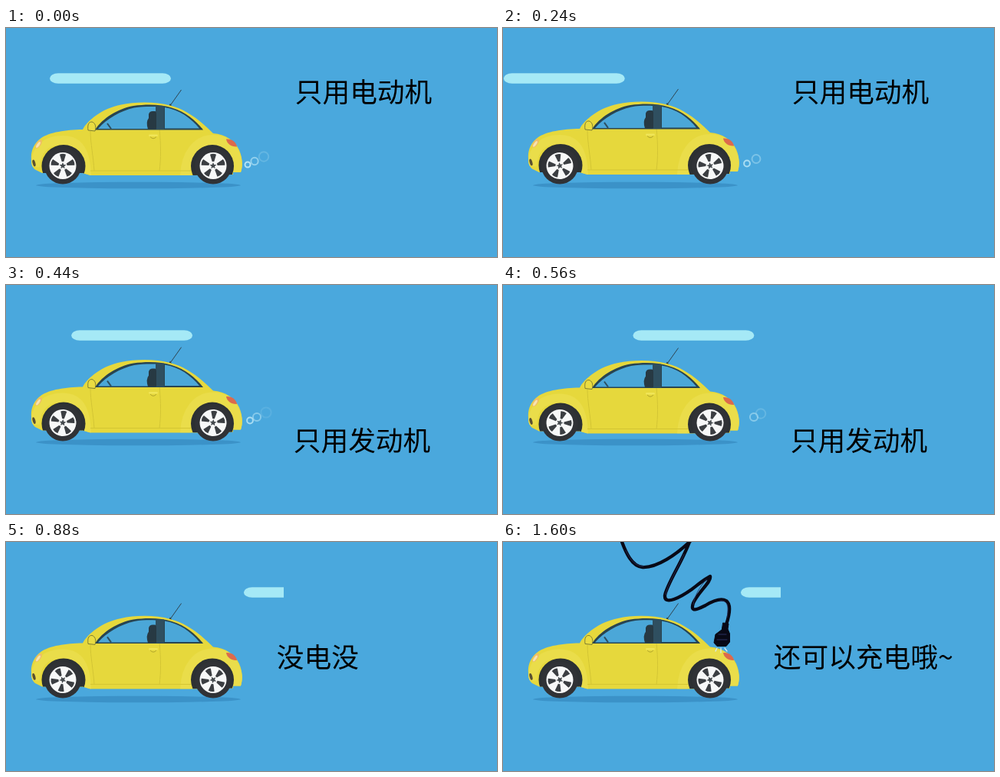
Write an HTML page that moves like this. It is 640 by 300 pixels and loops after 2160 ms.

```html
<!DOCTYPE html>
<html lang="zh-CN">
<head>
<meta charset="utf-8">
<title>Car</title>
<style>
  html, body { margin: 0; width: 100%; height: 100%; overflow: hidden; background: #4aa8dd; }
  svg { display: block; width: 640px; height: 300px; }
  text { font: 400 35.7px "Noto Sans CJK SC", "Noto Sans CJK", sans-serif; fill: #000; white-space: pre; }
</style>
</head>
<body>
<svg viewBox="0 0 640 300">
  <defs>
    <clipPath id="road"><rect width="362" height="300"/></clipPath>
    <clipPath id="shell"><use href="#body"/></clipPath>
    <g id="rim">
      <circle r="17.500" fill="#f7f8f8"/>
      <g id="gaps" fill="#3b3e42"></g>
      <circle r="4.600" fill="#f7f8f8"/>
      <path d="M0-4.6 1.3-1.6 4.4-1.4 2 .7 2.7 3.8 0 2.1-2.7 3.8-2 .7-4.4-1.4-1.3-1.6Z" fill="#454a4e"/>
    </g>
  </defs>

  <rect width="640" height="300" fill="#4aa8dd"/>
  <g clip-path="url(#road)">
    <rect id="bar" y="59.300" width="158" height="13.400" rx="11" ry="6.700" fill="#a5e9f6"/>
  </g>
  <ellipse cx="172.500" cy="206" rx="133.500" ry="4.300" fill="#3b92c8"/>
  <g id="smoke" fill="none" stroke="#b5e3f5" stroke-width="2"></g>

  <g id="car">
    <path d="M213 103 228.500 81" stroke="#2f4450"/>
    <path d="M211 104 214 99 217 104Z" fill="#2a363d"/>
    <path id="body" fill="#e6d83c" d="M33 172C32 162 36 151 46 144C56 137 78 133 100 133C106 121 126 105 150 100.500
      C168 96.500 195 96 214 101.500C236 107 254 122 270 138C286 139 299 148 304 160C308 169 309 180 306 189
      L296 189V192L241 193H110L100 190H47L38 185.500C34 182 33 178 33 172Z"/>
    <g clip-path="url(#shell)" fill="none">
      <path d="M38 182C39 157 53 147 74 147C96 147 104 163 105 194" stroke="#eadd4a" stroke-width="12"/>
      <path d="M234 194C235 164 250 147 270 147C290 147 301 161 303 190" stroke="#eadd4a" stroke-width="14"/>
      <path d="M110 187H241" stroke="#d3c534"/>
      <path d="M110 135C110 150 114 170 115 187M200 133C202 153 202 172 200 187" stroke="#d3c534"/>
      <g fill="#2c3033">
        <ellipse cx="75" cy="181" rx="28.500" ry="28"/>
        <ellipse cx="269" cy="181" rx="28" ry="28"/>
      </g>
    </g>

    <path d="M116 133.500C126 118 145 106 166 102C184 99.500 203 100 216 104.500C235 110 248 122 257 133.500Z" fill="#284451"/>
    <path d="M120 132C131 119 149 108.500 167 104.500C177 102.800 187 102.800 195 103V132Z" fill="#4ba7d8"/>
    <path d="M207 104C226 107 241 118 252 131.500L207 131.500Z" fill="#4ba7d8"/>
    <path d="M195 102H206V133H195Z" fill="#2f4f60"/>
    <path d="M186 113Q187 109 191 109H194Q196 109 196 113V132.500H185Q182 123 186 118Z" fill="#273943"/>
    <path d="M132 125 137 132" stroke="#2d5062" stroke-width="2"/>
    <path d="M107 134C106 126 108 123 112 123C116 124 118 129 116 135Z" fill="#eadc41" stroke="#65672f" stroke-width=".8"/>
    <rect x="186" y="139.500" width="12" height="2.500" rx="1.200" fill="#f0e558"/>
    <path d="M188 142.500Q192 147 196 142.500" fill="none" stroke="#b3a72b"/>

    <ellipse cx="42.500" cy="152" rx="3" ry="6.500" transform="rotate(34 42.500 152)" fill="#efbd66"/>
    <ellipse cx="42" cy="153" rx="1.600" ry="4.500" transform="rotate(34 42 153)" fill="#f5e4b0"/>
    <path d="M287 145.500C294 145 300 149 301 155.500C294 156 288 152 287 145.500Z" fill="#dc6a4c"/>
    <ellipse cx="36.500" cy="177" rx="1.800" ry="4.500" transform="rotate(-16 36.500 177)" fill="#5a5030"/>
  </g>

  <g id="wheels"></g>

  <g id="plug" fill="none" stroke="#080916" stroke-linecap="round" stroke-linejoin="round">
    <path stroke-width="4.300" d="M154-3C160 14 168 32 182 33C200 34 226 17 246-3M244-3C237 20 213 56 211 70
      C210 84 232 72 246 62C254 56 262 49 270 45C272 52 254 66 248 80C243 94 256 87 264 83
      C274 77 284 73 291 77C298 82 295 96 291 108"/>
    <path stroke="#2b3160" stroke-width=".8" d="M160 11C166 24 173 32 183 32M236 16C226 38 214 56 212 69
      M265 49C257 58 249 71 248 82M283 77C294 76 294 86 292 99"/>
    <path d="M287 106 294 107 293 114 295.500 120V131L291 136.500H279L275 132 277 121 285 115Z" fill="#080916"/>
    <path d="M281 121H291M279 128H292" stroke="#2b3160" stroke-width="1"/>
    <path d="M279 139 277 143M284 139V145M289 139 292 143" stroke="#d7edf5" stroke-width="1.300"/>
  </g>
  <text id="label"></text>
</svg>
<script>
const STEP = 40, LOOP = 2160, DRIVE = 19, LAST = 27;
const $ = id => document.getElementById(id);
const puffs = [336, 324, 315];
const lines = {
  electric: ['只用电动机', 376.8, 97],
  engine: ['只用发动机', 374.8, 217],
  empty: ['没电没油了！！！', 352.8, 164],
  charge: ['还可以充电哦~', 352.8, 164]
};

$('gaps').innerHTML = [0, 1, 2, 3, 4].map(i =>
  `<path transform="rotate(${i * 72})" d="M-4-14.800Q0-16.500 4-14.800L1.300-5.500H-1.300Z"/>`).join('');
$('wheels').innerHTML = [74, 270].map(x =>
  `<g transform="translate(${x} 180.500)"><circle r="24" fill="#303236"/>
   <use class="spin" href="#rim"/></g>`).join('');
$('smoke').innerHTML = puffs.map(() => '<circle/>').join('');

const spins = document.querySelectorAll('.spin');
const rings = $('smoke').children;

function set(el, attrs) {
  for (const k in attrs) el.setAttribute(k, attrs[k]);
}

// Scenery phase: the drive cycle is cut into two runs, then the car stands.
function phase(i) {
  if (i === 0) return 0;
  if (i === 1) return 9;
  if (i <= 10) return i - 8;
  return Math.min(i - 10, 9);
}

function say([str, x, y], count = str.length) {
  set($('label'), { x, y });
  $('label').textContent = str.slice(0, count);
}

function drawScene(n) {
  const bob = 1.5 * Math.cos((n - 4) * Math.PI / 8);
  set($('bar'), { x: 57 + 28.1 * n });
  set($('car'), { transform: `translate(0 ${bob.toFixed(2)})` });
  spins.forEach(s => set(s, { transform: `rotate(${5 * n})` }));
  puffs.forEach((start, i) => {
    const x = start + 3 * n, d = x - 315;
    const seen = d >= 0 && d <= 25;
    set(rings[i], {
      cx: x, cy: 179 - d / 2, r: Math.max(0, 3.5 + d * .13),
      opacity: seen ? 1 - d / 28 : 0
    });
  });
}

function draw(t) {
  const i = Math.min(LAST, Math.floor(t / STEP));
  const charging = t >= 1600;
  drawScene(phase(i));
  $('plug').style.display = charging ? '' : 'none';
  if (charging) say(lines.charge);
  else if (i < 9) say(lines.electric);
  else if (i < DRIVE) say(lines.engine);
  else say(lines.empty, i - DRIVE);
}

const start = performance.now();
function tick() {
  draw((performance.now() - start) % LOOP);
  requestAnimationFrame(tick);
}
draw(0);
requestAnimationFrame(tick);
</script>
</body>
</html>
```
